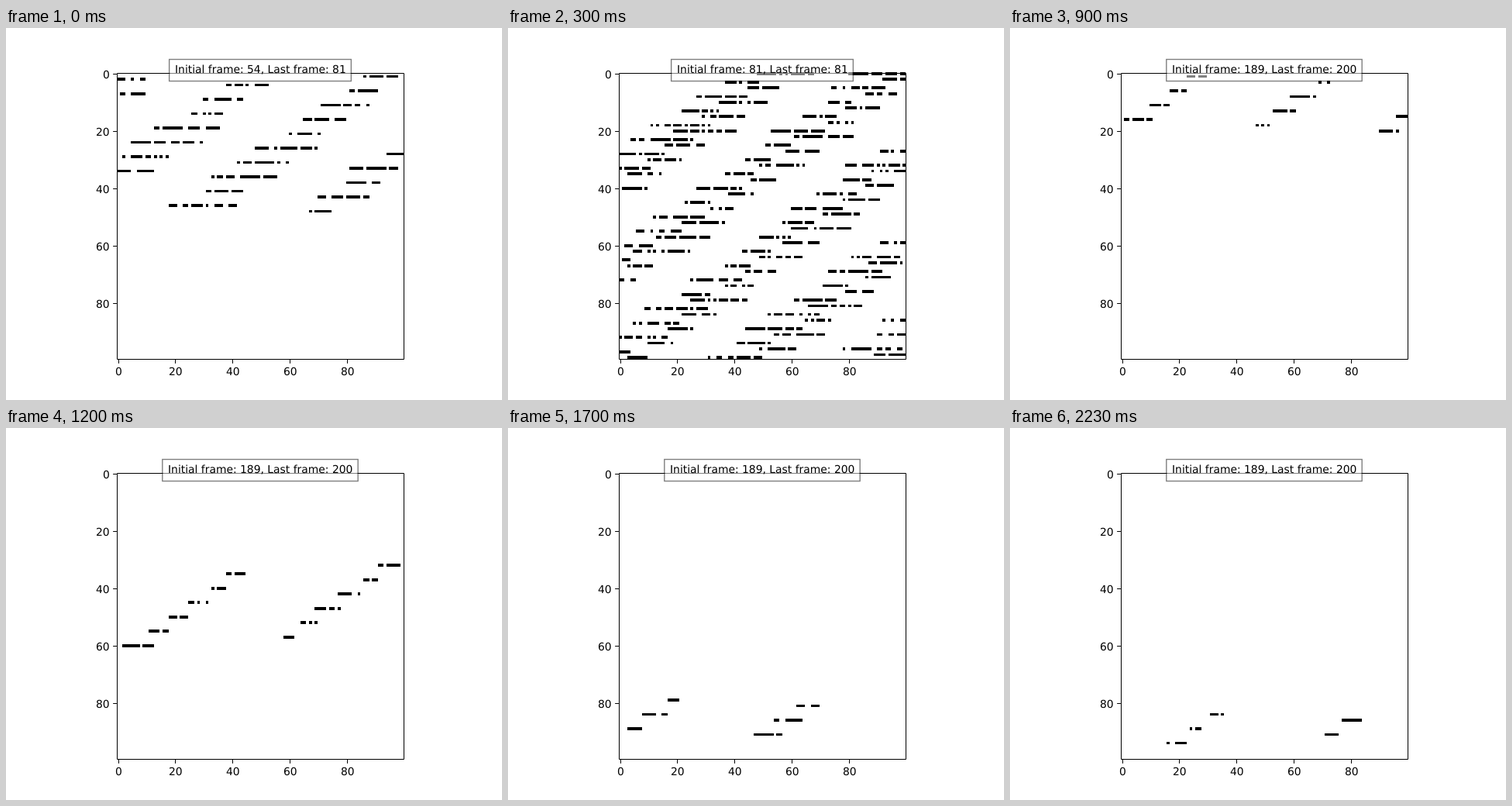
Write an HTML page that moves like this. It is 640 px wide and 480 px high and loops after 2.33 s.

```html
<!DOCTYPE html>
<html>
<head>
<meta charset="utf-8">
<style>
html, body { margin: 0; width: 100%; height: 100%; overflow: hidden; background: #fff; }
svg { display: block; font: 13.89px "DejaVu Sans", sans-serif; text-rendering: geometricPrecision; }
#axes path { fill: none; stroke: #000; }
#box { fill: #fff; stroke: #000; stroke-width: 1.39; opacity: .5; }
</style>
</head>
<body>
<svg width="640" height="480" viewBox="0 0 640 480">
  <path id="cells" shape-rendering="crispEdges"/>
  <g id="axes"><path d="M143.5 58.5H513.5V427.5H143.5Z"/></g>
  <rect id="box" y="40.5" height="28"/>
  <text id="title" y="58"></text>
</svg>
<script>
const LOOP = 2330, SIZE = 100, LINE_STEP = 5, SLOPE = 1.4, SPEED = 3.7;
const $ = id => document.getElementById(id);
const edge = n => Math.floor(n * 3.7 + .45);
const px = c => 143 + edge(c);
const py = r => 57 + edge(r);

// Slanted stripes lie `gap` columns apart, each two rows later in the five-row raster.
// `sets` holds the first stripe's raster row and its centre column at row 0;
// `top` to `bottom` is the visible band of rows, moving `drift` rows per step.
const scenes = [
  { step: 0, from: 54, to: 81, top: 1, bottom: 48, drift: 15, width: 18, gap: 44, sets: [[2, 7]] },
  { step: 3, from: 81, to: 81, top: 0, bottom: 99, drift: 0, width: 15, gap: 44, sets: [[3, 47], [0, 58]] },
  { step: 5, from: 81, to: 200, top: 55, bottom: 99, drift: 15, width: 9, gap: 46.5, sets: [[0, 106]] },
  { step: 9, from: 189, to: 200, top: 0, bottom: 20, drift: 15, width: 7, gap: 46.5, sets: [[1, 28.5]] },
  { step: 12, from: 189, to: 200, top: 32, bottom: 60, drift: 10, width: 7, gap: 48.5, sets: [[0, 91.5]] },
  { step: 17, from: 189, to: 200, top: 79, bottom: 91, drift: 6, width: 7, gap: 49, sets: [[4, 130]] },
  { step: 23, from: 189, to: 200, top: 84, bottom: 94, drift: 1, width: 6, gap: 49, sets: [[4, 152]] }
];

function random(seed) {
  return () => (seed = seed * 16807 % 2147483647) / 2147483647;
}

// One raster line: a span of random width around its centre, broken into dashes.
function dashes(row, centre, width, rand) {
  const span = width * (.55 + .9 * rand());
  const end = Math.round(centre + span / 2);
  let path = "";
  for (let x = Math.round(centre - span / 2); x < end;) {
    const stop = Math.min(end, x + 1 + Math.floor(7 * rand() ** 1.5));
    const a = Math.max(0, x), b = Math.min(SIZE, stop);
    if (a < b) path += `M${px(a)} ${py(row)}H${px(b)}V${py(row + 1)}H${px(a)}Z`;
    x = stop + 1 + Math.floor(rand() * 1.6);
  }
  return path;
}

function stripes(scene, d) {
  const top = Math.max(0, scene.top + d * scene.drift);
  const bottom = Math.min(SIZE - 1, scene.bottom + d * scene.drift);
  const rand = random(7919 * (scene.step + 1));
  let path = "";
  for (const [phase, reach] of scene.sets) {
    for (let i = 0; i < LINE_STEP; i++) {
      const centre = reach + i * scene.gap + d * SPEED;
      for (let row = (phase + 2 * i) % LINE_STEP; row <= bottom; row += LINE_STEP) {
        const x = centre - SLOPE * row;
        if (row >= top && x > -3 && x < SIZE + 3) path += dashes(row, x, scene.width, rand);
      }
    }
  }
  return path;
}

function addLabel(text, x, y) {
  $("axes").insertAdjacentHTML("beforeend", `<text x="${Math.round(x)}" y="${y}">${text}</text>`);
}

for (let v = 0; v < SIZE; v += 20) {
  const offset = (v + .5) * 3.696, w = 8.84 * String(v).length;
  const x = 143.2 + offset, y = 57.6 + offset;
  $("axes").insertAdjacentHTML("beforeend",
    `<path d="M${Math.floor(x) + .5} 428v4.86M143 ${Math.floor(y) + .5}h-4.86"/>`);
  addLabel(v, x - w / 2, 448);
  addLabel(v, 133.5 - w, Math.ceil(y + 5));
}

function draw(step) {
  const scene = scenes.reduce((a, b) =>
    Math.abs(b.step - step) < Math.abs(a.step - step) ? b : a);
  $("cells").setAttribute("d", stripes(scene, step - scene.step));
  const title = $("title");
  title.textContent = `Initial frame: ${scene.from}, Last frame: ${scene.to}`;
  const w = title.getComputedTextLength();
  title.setAttribute("x", Math.round(328 - w / 2));
  $("box").setAttribute("x", 328 - w / 2 - 7);
  $("box").setAttribute("width", w + 14);
}

let shown = -1;
function tick() {
  const t = performance.now() % LOOP;
  const step = t < 2230 ? Math.floor(t / 100) : 23;
  if (step !== shown) draw(shown = step);
  requestAnimationFrame(tick);
}
tick();
</script>
</body>
</html>
```
